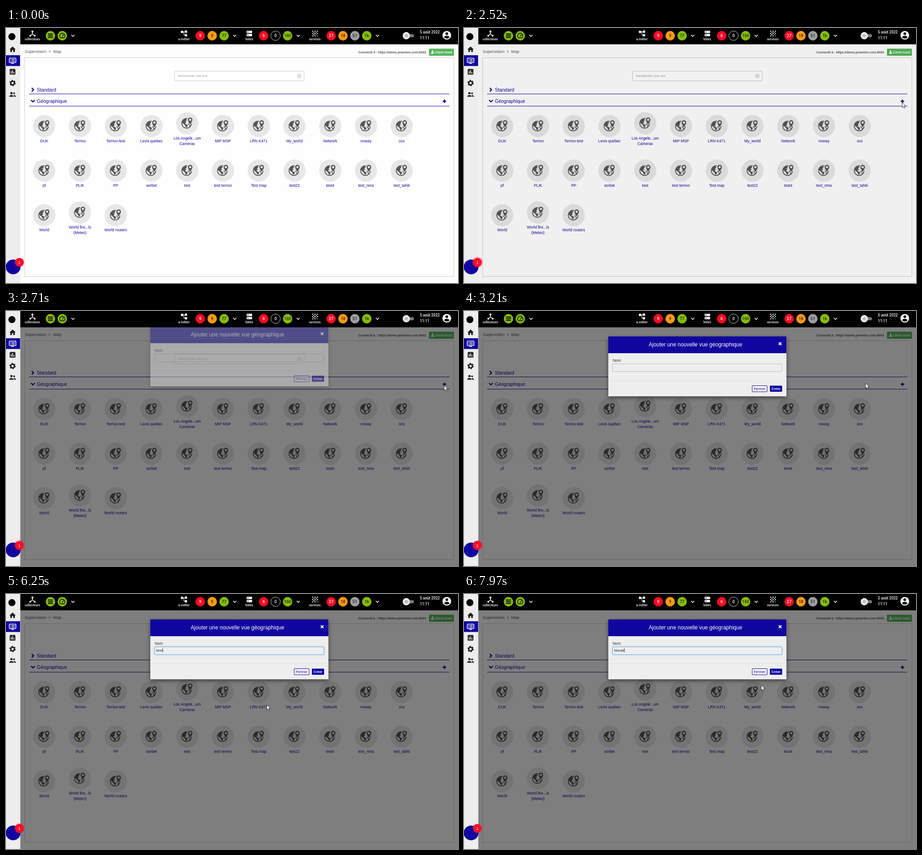
Write an HTML page that moves like this. It is 996 px wide and 562 px high and loops after 8000 ms.

```html
<!DOCTYPE html>
<html lang="fr">
<head>
<meta charset="utf-8">
<title>Vue géographique</title>
<style>
  html, body { margin: 0; width: 100%; height: 100%; overflow: hidden; background: #fff; }
  svg { display: block; width: 996px; height: 562px; font-family: "Liberation Sans", Arial, sans-serif; }
  .mid { text-anchor: middle; }
  .blue { fill: #10069f; }
  .nav text { font-family: Roboto, sans-serif; font-weight: 500; }
  .line { fill: none; stroke: currentColor; }

  #cursor   { animation: move 8s linear infinite; }
  #backdrop { animation: dim 8s step-end infinite; }
  #modal    { animation: drop 8s step-end infinite; }
  #focus    { animation: focus 8s linear infinite; }
  #pulse    { animation: pulse 1s linear infinite; transform-origin: 29.5px 516.5px; }

  @keyframes move {
    0%, 1.24% { transform: translate(1100px, 600px); }
    1.25%  { transform: translate(965px, 533px); }
    11.1%  { transform: translate(961px, 383px); }
    22.4%  { transform: translate(960px, 198px); }
    25%, 37.5% { transform: translate(965.5px, 164px); animation-timing-function: ease-in-out; }
    43.9%  { transform: translate(736px, 150px); }
    48.75% { transform: translate(600px, 122px); }
    54.1%  { transform: translate(590px, 124px); }
    57.8%, 93.75% { transform: translate(574.5px, 244px); }
    97.1%  { transform: translate(614px, 224px); }
    99.6%, 100% { transform: translate(655px, 201px); }
  }
  @keyframes dim {
    0% { opacity: 0; }
    31.5% { opacity: .055; }
    32.625% { opacity: .385; }
    33.875%, 100% { opacity: .5; }
  }
  @keyframes drop {
    0% { opacity: 0; transform: translateY(-33px); }
    33.875% { opacity: .4; transform: translateY(-22px); }
    35.125% { opacity: 1; transform: translateY(-8px); }
    36.375% { opacity: 1; transform: translateY(-1px); }
    37.625%, 100% { opacity: 1; transform: none; }
  }
  @keyframes focus {
    0%, 48.75% { opacity: 0; }
    50.6%, 100% { opacity: 1; }
  }
  @keyframes pulse {
    from { transform: scale(1); opacity: .6; }
    to { transform: scale(1.45); opacity: 0; }
  }
</style>
</head>
<body>
<svg viewBox="0 0 996 562">
  <defs>
    <clipPath id="below"><rect x="31" y="36" width="965" height="526"/></clipPath>
    <filter id="shadow" x="-10%" y="-20%" width="120%" height="150%"><feGaussianBlur stdDeviation="4.9"/></filter>
    <filter id="glow" x="-5%" y="-80%" width="110%" height="260%"><feGaussianBlur stdDeviation="2.2"/></filter>
    <g id="tile">
      <circle r="24.5" fill="#e7e7e7"/>
      <circle cx="-1.3" r="10.700" fill="none" stroke="#555" stroke-width="1.700"/>
      <path d="M-11.500-3-7-9-2-9.500-1-6.500-4-4.500-2-2-5 0-3 2 0 3 1 5-2 10-4 6-6 3-10 0ZM2 0 6 .500 9 3 6 8 4 6.500 4.500 4 2 3Z" fill="#555"/>
      <path d="M6.200 4.500C3.500-.500.800-4 .800-7.800a5.700 5.700 0 0 1 11.400 0C12.200-4 8.900-.500 6.200 4.500Z" fill="#555" stroke="#e7e7e7" stroke-width="1.400"/>
      <circle cx="6.500" cy="-7.800" r="2.500" fill="#e7e7e7"/>
    </g>
    <path id="chevron" d="M-3.400-1.700 0 1.700 3.400-1.700" fill="none" stroke="#fff" stroke-width="1.600"/>
    <rect id="field" x="327.500" y="116.500" width="373" height="17" rx="1.500"/>
  </defs>

  <!-- page -->
  <rect width="996" height="562" fill="#fefefe"/>
  <g font-size="9.2" fill="#555"><text x="41" y="55">Supervision</text><text x="93.5" y="55">&gt;</text><text x="104" y="55">Map</text></g>
  <text x="925.5" y="56" font-size="6.9" font-weight="700" fill="#555" text-anchor="end">Connecté à : https://demo.pravelon.com:8443</text>
  <rect x="932" y="45.500" width="55" height="15.700" rx="1.500" fill="#57b55b"/>
  <path d="M939 49h2v3h2l-3 3-3-3h2ZM936.500 54.500v2.200h7v-2.200" fill="#fff"/>
  <text x="945" y="56" font-size="6.900" font-weight="700" fill="#fff">Client lourd</text>
  <rect x="41" y="65.500" width="946" height="482" fill="none" stroke="#ccc"/>
  <rect x="371.500" y="95" width="285.500" height="21.500" rx="2" fill="#fff" stroke="#c4c4c4"/>
  <text x="379" y="108.300" font-size="7.200" fill="#999">Rechercher une vue</text>
  <g color="#aaa" class="line"><circle cx="646.300" cy="105.500" r="4"/><path d="m644.600 103.800 3.400 3.400m0-3.400-3.400 3.400"/></g>
  <g class="blue" font-size="10.500"><text x="68" y="139.700">Standard</text><text x="68" y="165.300">Géographique</text></g>
  <g color="#10069f" class="line">
    <path d="m56.700 132 4.100 4.100-4.100 4.100M55.200 158.700l4.100 4.100 4.100-4.100M962.300 161.500h7.600m-3.800-3.800v7.600" stroke-width="2.300"/>
    <path d="M51 145.300h926M51 172.200h926"/>
  </g>
  <g id="tiles"></g>

  <rect id="backdrop" x="31" y="36" width="965" height="526"/>

  <!-- dialog -->
  <g clip-path="url(#below)"><g id="modal">
    <rect x="318" y="59.200" width="392.500" height="132" opacity=".5" filter="url(#shadow)"/>
    <rect x="318" y="56" width="392.500" height="132" fill="#eee"/>
    <rect x="318" y="56" width="392.500" height="37" class="blue"/>
    <text x="510" y="78" class="mid" font-size="11.850" fill="#fff">Ajouter une nouvelle vue géographique</text>
    <path d="m693.700 69.200 5.800 5.800m0-5.800-5.800 5.800" stroke="#fff" stroke-width="2.300"/>
    <text x="327.700" y="112" font-size="8.500" fill="#333">Nom</text>
    <use href="#field" fill="#eee" stroke="#bbb"/>
    <g id="focus">
      <use href="#field" fill="#66afe9" opacity=".6" filter="url(#glow)"/>
      <use href="#field" fill="#eee" stroke="#66afe9"/>
    </g>
    <text id="name" x="331" y="126.800" font-size="7.100" fill="#222"></text>
    <rect id="caret" y="120" width=".9" height="8.500" fill="#111"/>
    <path d="M318 153.500h392.500" stroke="#e3e3e3"/>
    <rect x="635" y="164.500" width="33" height="13.500" rx="1" fill="#f2f2f2" stroke="#10069f"/>
    <text x="651.500" y="174" class="mid blue" font-size="7.900">Fermer</text>
    <rect x="674" y="164.500" width="27" height="13.500" rx="1" class="blue"/>
    <text x="687.500" y="174" class="mid" font-size="7.400" font-weight="700" fill="#fff">Créer</text>
  </g></g>

  <!-- sidebar -->
  <rect width="31.500" height="562" fill="#ededed"/>
  <rect y="60" width="31" height="23.700" class="blue"/>
  <circle cx="13" cy="19" r="7.800"/>
  <g fill="#222">
    <path d="M14.500 40.800 7.500 47.200h2V53H13v-4h3v4h3.500v-5.800h2Z"/>
    <rect x="8.200" y="90.200" width="12.500" height="12.500" rx="1.500"/>
    <circle cx="14.500" cy="121.300" r="4" fill="none" stroke="#222" stroke-width="3"/>
    <circle cx="14.500" cy="121.300" r="6" fill="none" stroke="#222" stroke-width="2" stroke-dasharray="3.140"/>
    <circle cx="12" cy="143.500" r="2.600"/><circle cx="17.800" cy="144" r="2"/>
    <path d="M7 151.500c0-5 10-5 10 0ZM18 151.500c0-2-.7-3-1.500-3.700 2-.6 5.500.4 5.500 3.700Z"/>
  </g>
  <path d="M11.500 95v5.500m3-7.500v7.500m3-3.500v3.500" stroke="#fff" stroke-width="1.500"/>
  <g color="#fff" class="line" stroke-width="1.500">
    <rect x="7.300" y="66.500" width="14.500" height="9.800" rx="1"/>
    <path d="M9.500 69.700h1.500m1.200 0h7.300m-10 3.300H11m1.200 0h7.300M11.500 78h6"/>
  </g>
  <circle cx="15.700" cy="526.500" r="16.300" class="blue"/>
  <circle id="pulse" cx="29.500" cy="516.500" r="9.800" fill="#f8102c"/>
  <circle cx="29.500" cy="516.500" r="9.800" fill="#f8102c"/>
  <text x="29.300" y="519.700" class="mid" font-size="8.500" fill="#fff">1</text>

  <!-- top bar -->
  <g class="nav">
    <rect x="31.500" width="965" height="36"/>
    <g fill="#fff">
      <circle cx="58.300" cy="7.800" r="2.200"/><circle cx="53.500" cy="17" r="2"/><circle cx="63.200" cy="17" r="2"/>
      <path d="M58.300 8v5l-4.800 4m4.800-4 4.800 4" fill="none" stroke="#fff" stroke-width="1.500"/>
      <path d="M385.500 6h5v5h-5zM394 5.500h5v5h-5zM394 13.500h5v5h-5z"/>
      <path d="M390 8.300h4m-2 0v7.700h2" fill="none" stroke="#fff"/>
      <rect x="530.300" y="6" width="12" height="5.300" rx="1"/><rect x="530.300" y="13" width="12" height="5.300" rx="1"/>
    </g>
    <path d="M532.300 8.600h1.800m-1.800 7h1.800" stroke="#000" stroke-width="1.600"/>
    <g id="dots"></g>
    <g id="nav"></g>
    <g color="#222" class="line" stroke-width="1.800">
      <path d="M92.500 13.200h11m-11 3.800h11m-11 3.800h11" stroke-width="2.600"/>
      <path d="M120 21.500a5.800 5.800 0 1 1 8 0Z"/><path d="m123.500 18.500 4-4.500"/>
    </g>
    <rect x="884" y="13.500" width="15" height="7" rx="3.500" fill="#777"/>
    <circle cx="882" cy="17" r="7.900" fill="#fff"/>
    <circle cx="882" cy="17" r="2.200" fill="none" stroke="#444"/>
    <circle cx="882" cy="17" r="4.600" fill="none" stroke="#444" stroke-width="1.600" stroke-dasharray="1 2.610"/>
    <g fill="#fff" font-size="8.200"><text x="912" y="12.200">5 août 2022</text><text x="912" y="25.200">11:11</text></g>
    <circle cx="971.300" cy="16" r="9.600" fill="#fff"/>
    <circle cx="971.300" cy="12.600" r="3"/><path d="M965.300 20.500c1.500-4.500 10.500-4.500 12 0-3 3.700-9 3.700-12 0Z"/>
  </g>

  <path id="cursor" d="M0 0v11.200l2.600-2.400 1.800 4 1.900-.8-1.800-4h3.600Z" fill="#fff" stroke="#111" stroke-width=".8"/>
</svg>
<script>
const $ = id => document.getElementById(id);
const text = (x, y, s, attrs) => `<text x="${x}" y="${y}" class="mid" ${attrs}>${s}</text>`;

const rows = [
  "DUK,Terrivo,Terrivo-test,Levis quebec,Los Angele...um|Cameras,MIP MSP,LRN K471,My_world,Network,noway,ocs",
  "pf,PLIK,PP,sorbet,test,test terrivo,Test map,test22,test4,test_nma,test_tahiti",
  "World,World fire...ls|(Meteo),World routers"
];
$("tiles").innerHTML = rows.map((row, r) => row.split(",").map((name, c) => {
  const x = 84.2 + 78.78 * c, lines = name.split("|");
  const y = 216 + 98.3 * r - 6 * (lines.length - 1);
  return `<use href="#tile" x="${x}" y="${y}"/>` +
    lines.map((s, i) => text(x, y + 35.7 + 12 * i, s, 'font-size="8.4" fill="#10069f"')).join("");
}).join("")).join("");

const red = "#ff0a24", orange = "#ff9a13", green = "#84bd00", grey = "#9e9e9e";
const bubble = ([x, fill, value]) =>
  `<circle cx="${x}" cy="17" r="10.4" fill="${fill}" ${fill === "none" ? 'stroke="#ccc"' : ""}/>` +
  text(x, 20.3, value, `font-size="9" fill="${fill === red || fill === "none" ? "#fff" : "#222"}"`);
$("nav").innerHTML =
  [[98, green, ""], [124, green, ""], [428, red, 9], [454.3, orange, 9], [480.6, green, 77],
   [567.7, red, 6], [594, "none", 0], [620.5, green, 160],
   [716.4, red, 27], [742.5, orange, 18], [768.7, grey, 51], [795, green, "1k"]].map(bubble).join("") +
  [147.5, 504, 644, 818.5].map(x => `<use href="#chevron" x="${x}" y="17"/>`).join("") +
  [[58, "collecteurs"], [392, "a.métier"], [536, "hôtes"], [680.5, "services"]]
    .map(([x, s]) => text(x, 26.6, s, 'font-size="6.8" fill="#fff"')).join("");

// Checkerboard of dots for the services icon
for (let i = 0; i < 25; i += 2) {
  const x = 675.8 + 2.6 * (i % 5), y = 7 + 2.6 * Math.floor(i / 5);
  $("dots").innerHTML += `<circle cx="${x}" cy="${y}" r="1.2" fill="${i > 17 && i % 5 > 2 ? "#2ad" : "#fff"}"/>`;
}

const word = "Monde", keyTimes = [5800, 5980, 6160, 6400, 6560], focusTime = 4000;
function draw(now) {
  const t = now % 8000;
  const typed = keyTimes.filter(k => k <= t);
  const since = t - (typed.at(-1) ?? focusTime);
  const name = $("name");
  name.textContent = word.slice(0, typed.length);
  $("caret").setAttribute("x", 331 + (typed.length ? name.getComputedTextLength() : 0));
  $("caret").style.opacity = since >= 0 && since % 1000 < 500 ? 1 : 0;
  requestAnimationFrame(draw);
}
requestAnimationFrame(draw);
</script>
</body>
</html>
```
